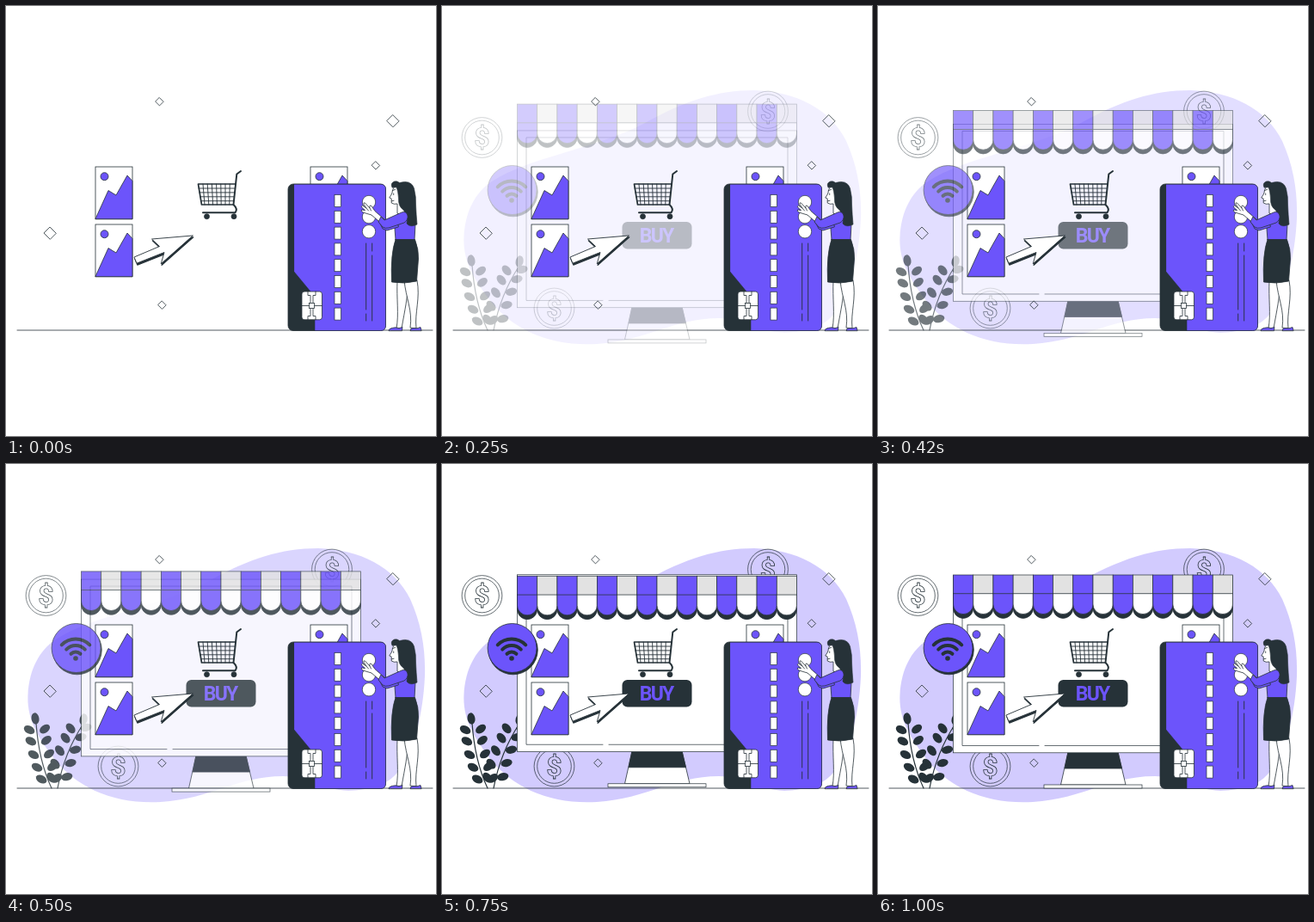
Animation of 500 by 500 pixels, one loop 1040 ms. Source, as an HTML page:

```html
<!DOCTYPE html>
<html lang="en">
<head>
<meta charset="utf-8">
<title>Online shop</title>
<style>
  html, body { margin: 0; width: 100%; height: 100%; overflow: hidden; background: #fff; }
  svg { display: block; width: 100%; height: 100%; }
  text { font-family: Roboto, "Open Sans", sans-serif; font-weight: 700; text-anchor: middle; }
</style>
</head>
<body>
<svg id="stage" viewBox="0 0 500 500" xmlns="http://www.w3.org/2000/svg"></svg>
<script>
const INK = '#263238', HUE = '#6c54fb', WHITE = '#fff';
const LOOP = 1040, FRAME = 1000 / 24, SHIFT = 21;

// Markup helpers
const path = (d, fill = 'none', w = 0.8, line = INK) =>
  `<path d="${d}" fill="${fill}" stroke="${w ? line : 'none'}" stroke-width="${w}" stroke-linejoin="round" stroke-linecap="round"/>`;
const disc = (x, y, r, fill = 'none', w = 0.8) =>
  `<circle cx="${x}" cy="${y}" r="${r}" fill="${fill}" stroke="${w ? INK : 'none'}" stroke-width="${w}"/>`;
const box = (x, y, w, h, fill = 'none', r = 0, sw = 0.8) =>
  `<rect x="${x}" y="${y}" width="${w}" height="${h}" rx="${r}" fill="${fill}" stroke="${sw ? INK : 'none'}" stroke-width="${sw}"/>`;
const group = (body, attrs) => `<g ${attrs}>${body}</g>`;
const fade = (body, slide = 0) => group(body, `class="fade" data-slide="${slide}"`);
const repeat = (n, fn) => Array.from({ length: n }, (_, i) => fn(i)).join('');

function backdrop() {
  return group(path('M25.5 268C27 240 38 217 58 204C100 176 180 166 236 136C283 110 320 98 363 98C411 99 452 120 470 157' +
    'C483 186 488 215 487 247C485 290 475 330 457 356C445 374 422 379 398 380C365 378 348 363 322 363' +
    'C268 363 240 389 180 393C128 396 82 378 54 340C36 316 24 295 25.5 268Z', HUE, 0), 'opacity=".3"');
}

function coin(x, y) {
  return disc(x, y, 23.4, 'none', 0.7) + disc(x, y, 19.8, 'none', 0.7) +
    `<text x="${x}" y="${y + 11.2}" font-size="32" fill="none" stroke="${INK}" stroke-width=".8">$</text>`;
}

// A stem along a quadratic curve with leaves in pairs
function sprig([ax, ay], [bx, by], [cx, cy], lean) {
  const at = (a, b, c, u) => (1 - u) ** 2 * a + 2 * u * (1 - u) * b + u * u * c;
  const leaf = (x, y, turn) =>
    `<ellipse rx="6.7" ry="4.5" fill="${INK}" transform="translate(${x} ${y}) rotate(${turn})"/>`;
  const pairs = [0.1, 0.3, 0.5, 0.7, 0.86].map(u => {
    const x = at(ax, bx, cx, u), y = at(ay, by, cy, u);
    return leaf(x - 9, y - 4, 28 + lean) + leaf(x + 9, y - 5, lean - 36);
  });
  return path(`M${ax} ${ay}Q${bx} ${by} ${cx} ${cy}`, 'none', 1.2) +
    pairs.join('') + leaf(cx - 1 + lean / 20, cy - 5, 80 + lean);
}

function monitor() {
  return path('M221 335L212.5 373H288L279 335Z', WHITE) +
    path('M221 335L217 354H283.5L279 335Z', INK) +
    box(193, 373, 114, 4, WHITE, 0, 0.7) +
    box(87.5, 130, 325, 205.8, WHITE, 0, 0.7) +
    path('M187 327.5H98V138H402V327.5H194', 'none', 0.7);
}

function awning() {
  const w = 325 / 14, r = w / 2;
  const flap = (x, y) => `M${x} 150.8V${y}a${r} ${r} 0 0 0 ${w} 0V150.8Z`;
  const x = i => 87.5 + i * w;
  return repeat(14, i => path(flap(x(i), 167.8), INK, 0.7)) +
    repeat(14, i => path(flap(x(i), 163), i % 2 ? WHITE : HUE, 0.7) +
      box(x(i), 129, w, 21.8, i % 2 ? '#e2e2e2' : HUE, 0, 0.7));
}

function wifi() {
  const arc = r => {
    const s = r * 0.72, h = r * 0.69;
    return path(`M${81 - s} ${226 - h}A${r} ${r} 0 0 1 ${81 + s} ${226 - h}`, 'none', 4);
  };
  return disc(82.7, 216.2, 28.6, INK) + disc(81.6, 214, 28.5, HUE) +
    arc(7.6) + arc(15) + arc(22.6) + disc(81, 226, 2.8, INK, 0);
}

function button() {
  return box(209.5, 251, 81, 31.5, INK, 6, 0) +
    `<text x="249.2" y="275.3" font-size="23" letter-spacing="-1.8" fill="${HUE}">BUY</text>`;
}

function picture(x, y) {
  return group(box(0, 0, 43, 60.5, WHITE) + disc(10.5, 11.2, 4.5, HUE) +
    path('M0 60.5L15 27.5L24 33L37 10L43 16.5V60.5Z', HUE), `transform="translate(${x} ${y})"`);
}

const diamond = (x, y, r) => path(`M${x} ${y - r}l${r} ${r}l${-r} ${r}l${-r} ${-r}Z`);

function cart() {
  const bars = repeat(7, i => path(`M${229 + i * 5.2} 207L${231 + i * 4.8} 231`, 'none', 0.9));
  const rails = repeat(4, i => path(`M${224 + i * 0.8} ${212 + i * 4.9}H${266.5 - i * 0.6}`, 'none', 0.9));
  return bars + rails + path('M267 207H223.5L227.5 231H264.5', 'none', 1.7) +
    path('M273 192L268.3 195.5L264.5 231Q270 236 266.5 240.3H229', 'none', 2) +
    disc(233.5, 244.7, 3, INK) + disc(265, 244.7, 3, INK);
}

function cursor() {
  const d = 'M217 267L169.5 271L178.5 279.5L149 292L152 299.2L184 286.5L180.3 299.5Z';
  return group(path(d, INK, 1.2), 'transform="translate(.8 1.9)"') + path(d, WHITE, 0.9);
}

function card() {
  return box(328, 207, 113.5, 170.5, INK, 6) +
    path('M335 207.3H435.5Q441.5 207.3 441.5 213V371.5Q441.5 377.5 435.5 377.5H359V338L335 309Z', HUE, 0.6) +
    repeat(8, i => box(382, 219.5 + i * 18.8, 7.5, 14, WHITE, 0, 0.7)) +
    repeat(3, i => disc(422, 228 + i * 17.1, 7.7, WHITE, 0.7)) +
    path('M418.7 276V353M418.7 358V366M425.7 276V285M425.7 290V366', 'none', 0.9) +
    box(344, 332, 23.5, 32.8, WHITE, 3) +
    path('M344 348.5H352.5M358.5 348.5H367.5M351 332V336.5H354V345.5M360 332V336.5H357V345.5' +
      'M351 364.8V360.5H354V351.5M360 364.8V360.5H357V351.5') +
    box(352.5, 345.5, 6, 6, WHITE);
}

function woman() {
  const legs = path('M455 319C454 341 457 358 454 375H460C464 352 467 340 468 319Z', WHITE) +
    path('M463 319C465 340 473 354 470 374L477 375C475 356 482 340 478 319Z', WHITE);
  const shoes = path('M445 377.3Q445 374.5 453 373.8Q457 375.5 461 373.5L460.5 377.3Z', HUE) +
    path('M470 377.3Q470 374.5 474 374.5Q478 375.5 482 373.5L483 377.3Z', HUE);
  const skirt = path('M453 271.5H475.5Q480 283 479.5 294L477.5 320Q463 323.5 448.5 321Q447 288 453 271.5Z', INK);
  const body = path('M456 241Q464 237 472 240L476 254L475 272H453L452 259L455 251Z', HUE);
  const farArm = path('M455 251L444 256L438 250L437 246L433 249L438 259L443 261L456 257Z', HUE);
  const face = path('M451 211Q449 214 448.8 218L445.8 223L448.2 224L448.2 229Q451 231 455 230V241Q460 245 465 239L464 212Z', WHITE) +
    path('M449.4 214.7L452.6 213.3M450.7 218V219.5M448.4 226.8L451 226.3');
  const hair = path('M449 211Q446.5 206 451.5 204Q455 203 457.5 205.5Q471 201.5 474.5 212Q477 222 476.5 231' +
    'Q477 243 478 254Q470 258 466 253Q468 245 462 237Q456 233 456.5 224Q456 215 454 210.5Z', INK, 0.6);
  const arm = path('M467 243Q465 238 460 240L440 249L436 245L433 251L438 257Q441 259 445 258L463 252Q468 249 467 243Z', HUE);
  const hand = path('M440 248L429 238.5L425 232.5Q422 231 423 235L417.5 229Q415.5 228 416 230.5L419 235' +
    'L414.5 232Q412.5 232.5 414 234.5L417.5 237.5L413.5 237Q412.5 238.5 415 240L425 243L435.5 252Z', WHITE) +
    path('M423 235L424.5 238M419 235L421.5 238');
  return legs + shoes + body + skirt + farArm + face + hair + hand + arm;
}

const stage = document.getElementById('stage');
stage.innerHTML =
  fade(backdrop()) +
  fade(coin(46.5, 153) + coin(379, 122.5) + coin(130.5, 351.5)) +
  fade(sprig([53, 377], [38, 345], [35, 301], 0) + sprig([60, 377], [68, 335], [90, 302], 22)) +
  path('M13 377H496', 'none', 0.8) +
  fade(monitor(), 1) + fade(awning(), -1) +
  diamond(178.5, 111.3, 4.6) + diamond(450, 133.8, 7) + diamond(430, 185.5, 4.6) +
  diamond(51.3, 264.3, 7) + diamond(181.5, 347.8, 4.6) +
  picture(104, 187) + picture(104, 254) + picture(354, 187) +
  fade(wifi()) + fade(button()) +
  cart() + cursor() + card() + woman();

// Cubic bezier (.36, -.01, .5, 1.38), solved by bisection
function ease(t) {
  if (t <= 0) return 0;
  if (t >= 1) return 1;
  const curve = (a, b, s) => 3 * (1 - s) ** 2 * s * a + 3 * (1 - s) * s * s * b + s ** 3;
  let lo = 0, hi = 1;
  for (let i = 0; i < 30; i++) {
    const mid = (lo + hi) / 2;
    if (curve(0.36, 0.5, mid) < t) lo = mid; else hi = mid;
  }
  return curve(-0.01, 1.38, lo);
}

const layers = [...stage.querySelectorAll('.fade')];

function draw(ms) {
  const step = Math.floor((ms + 5) / FRAME);
  const e = step < 2 ? 0 : ease((step + 0.8) / 24);
  for (const el of layers) {
    el.setAttribute('opacity', Math.max(0, Math.min(1, e)));
    el.setAttribute('transform', `translate(0 ${el.dataset.slide * SHIFT * (1 - e)})`);
  }
}

const start = performance.now();
function tick() {
  draw((performance.now() - start) % LOOP);
  requestAnimationFrame(tick);
}
tick();
</script>
</body>
</html>
```
